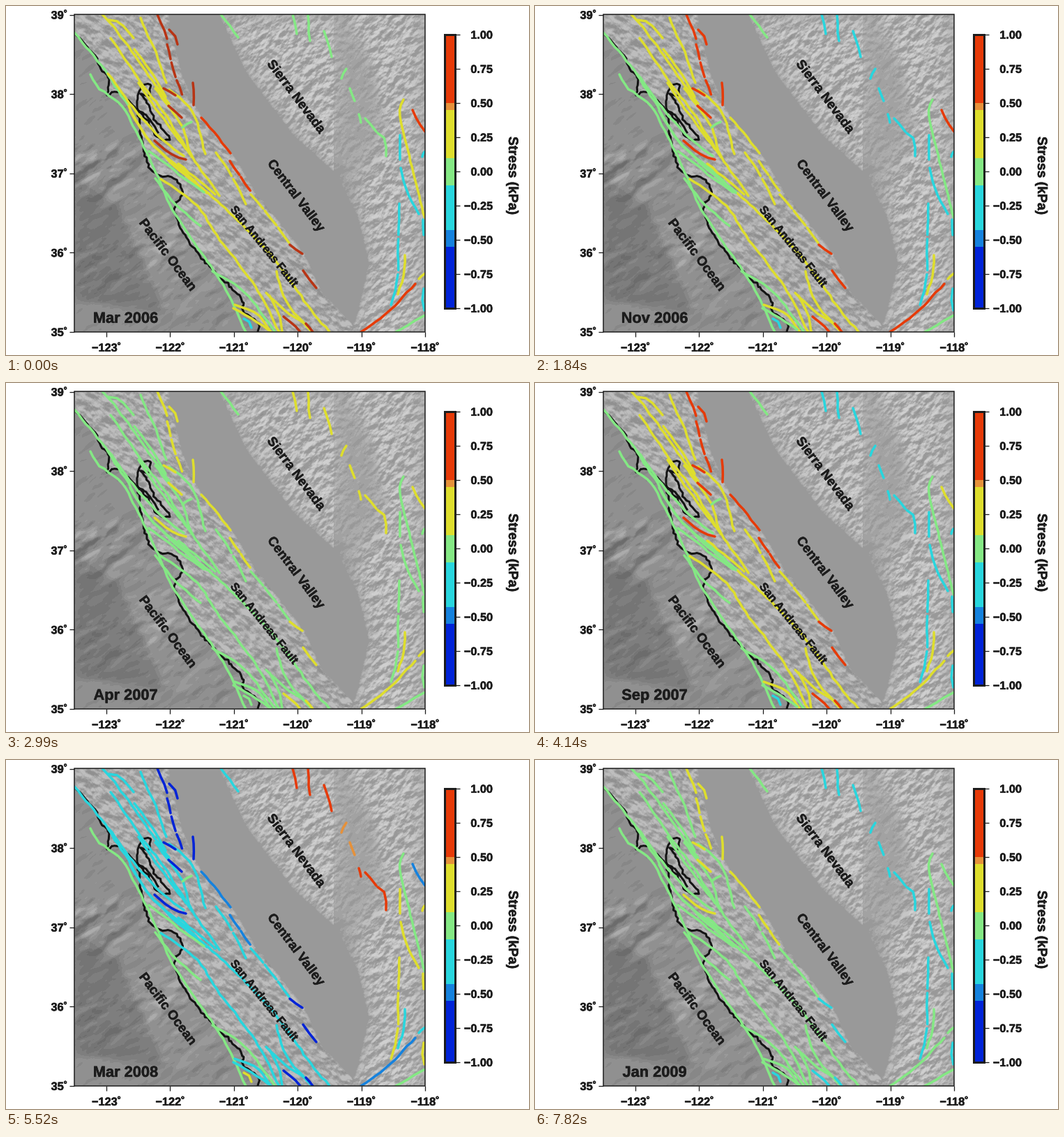
A matplotlib script that plays this animation: 750 by 500 pixels, repeating every 8000 ms.

```python
import numpy as np
import matplotlib.pyplot as plt
import matplotlib.patheffects as pe
from matplotlib.animation import FuncAnimation
from matplotlib.collections import LineCollection
from matplotlib.patches import Rectangle
from matplotlib.path import Path

W, H, DPI = 750, 500, 100
PX = 72 / DPI
LEFT, RIGHT, TOP, BOTTOM = 98, 601, 12, 467
MONTHS = 35
LOOP_MS = 8000
INK = "#1c1c1c"
NAMES = "Jan Feb Mar Apr May Jun Jul Aug Sep Oct Nov Dec".split()

# Stress classes, low to high
BOUNDS = [-0.55, -0.43, -0.1, 0.095, 0.45, 0.5, 1.05]
COLORS = ["#0023d8", "#1582de", "#28d6de", "#84e884",
          "#dede2d", "#e6913a", "#e63a08", "#b83414"]

rng = np.random.default_rng(12)

# ---- stress through time: yearly swing plus a slow drift ------------------
KEYS = np.array([0, 8, 13, 18, 24, 29, 34])
CURVES = {
    "coast": (0.4, [1, 0.45, 0.05, 0.65, -0.8, 0.9, 0.12]),
    "south": (0.4, [1.05, 0.7, 0.2, 0.75, -0.8, 0.85, -0.3]),
    "sierra": (-0.3, [-0.09, -0.3, 0.28, -0.3, 0.75, -0.3, -0.3]),
    "desert": (0.1, [0.75, 0.7, 0.4, 0.2, -0.45, 0.08, 0]),
}


def load(name, month):
    """Regional load; the yearly swing peaks in September."""
    swing, marks = CURVES[name]

    def year(m):
        return swing * np.cos(2 * np.pi * (m - 6) / 12)

    return year(month) + np.interp(month, KEYS, marks - year(KEYS))


# ---- curves ---------------------------------------------------------------
def spline(pts):
    """Catmull-Rom curve through a few points."""
    p = np.array(pts, float)
    p = np.vstack([2 * p[0] - p[1], p, 2 * p[-1] - p[-2]])
    t = np.linspace(0, 1, 12, endpoint=False)[:, None]
    out = []
    for a, b, c, d in zip(p, p[1:], p[2:], p[3:]):
        out.append(b + 0.5 * t * (c - a + t * (2 * a - 5 * b + 4 * c - d
                                               + t * (3 * (b - c) + d - a))))
    return np.vstack(out + [p[-2:-1]])


def resample(line, step, shake=0):
    dist = np.r_[0, np.cumsum(np.hypot(*np.diff(line, axis=0).T))]
    s = np.linspace(0, dist[-1], max(3, int(dist[-1] / step)))
    out = np.c_[np.interp(s, dist, line[:, 0]), np.interp(s, dist, line[:, 1])]
    out[1:-1] += rng.normal(0, shake, (len(s) - 2, 2))
    return out


faults, modes = [], []


def trace(mode, *pts, dashes=1, gap=0.16):
    """Add a fault, cut into equal dashes; mode is (curve, gain, offset)."""
    line = resample(spline(pts), 0.5)
    for part in np.array_split(line, dashes):
        if dashes > 1:
            part = part[:int(len(part) * (1 - gap))]
        faults.append(resample(part, 8, 0.5))
        modes.append(mode)


CALM = ("coast", 0.08, 0)
OUTER = ("coast", 0.12, -0.03)
BAYSIDE = ("coast", 0.13, 0)
COAST = ("coast", 0.32, 0)
MIDDLE = ("coast", 0.75, 0.08)
EDGE = ("coast", 1.0, 0.1)
SOUTH = ("south", 1.0, 0)
SIERRA = ("sierra", 1.0, 0)
FOOTHILL = ("sierra", 0.65, 0)
EAST = ("sierra", 0.45, -0.06)
BORDER = ("sierra", 0.5, -0.1)
DESERT = ("desert", 1.0, 0)

# San Andreas and the shore
trace(OUTER, (98, 38), (140, 90), (176, 143))
trace(BAYSIDE, (176, 143), (203, 190), (250, 236), (290, 268))
trace(COAST, (290, 268), (328, 303), (382, 360), (436, 433), (464, 467))
trace(CALM, (121, 98), (134, 119), (166, 143), (195, 196), (222, 253),
      (240, 294), (311, 400), (344, 467))
trace(CALM, (214, 247), (243, 284), (279, 315))
trace(CALM, (296, 380), (343, 411), (386, 467))
trace(COAST, (222, 248), (273, 285), (304, 331), (358, 403), (392, 467))
trace(COAST, (328, 428), (360, 441), (380, 467))
trace(BAYSIDE, (326, 433), (352, 448), (376, 464))
trace(BORDER, (341, 448), (347, 451), (352, 461))
trace(COAST, (373, 411), (401, 437), (429, 456))
trace(COAST, (388, 380), (403, 426), (438, 466))
trace(COAST, (378, 415), (390, 437), (396, 467))
trace(SOUTH, (398, 445), (411, 455), (422, 467))
trace(SOUTH, (430, 455), (440, 467))

# Coast ranges and the bay
trace(COAST, (138, 12), (153, 29), (191, 80), (234, 140))
trace(COAST, (147, 20), (163, 23), (183, 46))
trace(COAST, (150, 46), (188, 101), (231, 160), (267, 217))
trace(COAST, (193, 17), (202, 40), (215, 66), (230, 110))
trace(COAST, (184, 62), (206, 91), (229, 130))
trace(COAST, (214, 118), (252, 172), (268, 217), (306, 272))
trace(COAST, (190, 110), (217, 150), (258, 205))
trace(COAST, (234, 120), (268, 152), (286, 212))
trace(BAYSIDE, (146, 97), (191, 156), (220, 188), (255, 215))
trace(BAYSIDE, (178, 150), (207, 195), (254, 236), (288, 268))
trace(CALM, (205, 208), (250, 242), (284, 267))
trace(COAST, (247, 226), (300, 270))
trace(CALM, (253, 174), (266, 166))
trace(EDGE, (226, 118), (243, 128))
trace(EDGE, (233, 143), (252, 160))
trace(EDGE, (213, 193), (235, 211), (258, 220))

# West side of the valley
trace(EDGE, (217, 12), (231, 47))
trace(EDGE, (234, 34), (242, 42), (246, 55))
trace(EDGE, (231, 55), (241, 95), (254, 131), dashes=3)
trace(EDGE, (268, 110), (269, 142))
trace(MIDDLE, (280, 160), (300, 183), (322, 211))
trace(MIDDLE, (321, 222), (352, 267), dashes=2, gap=0.1)
trace(COAST, (301, 210), (322, 241), (346, 288), dashes=2, gap=0.1)
trace(COAST, (351, 270), (380, 304), (408, 342), dashes=3, gap=0.1)
trace(SOUTH, (407, 342), (425, 355))
trace(SOUTH, (426, 379), (445, 404))
trace(OUTER, (308, 12), (333, 45))

# Sierra Nevada and the east
trace(SIERRA, (411, 12), (417, 40))
trace(SIERRA, (433, 12), (433, 33), (436, 50))
trace(SIERRA, (456, 36), (467, 73))
trace(FOOTHILL, (488, 90), (481, 104))
trace(FOOTHILL, (493, 118), (500, 136))
trace(SIERRA, (506, 155), (509, 167))
trace(SIERRA, (515, 161), (531, 180))
trace(SIERRA, (533, 182), (543, 190), (545, 215))
trace(("desert", 0.13, 0), (570, 134), (564, 150), (577, 211), (601, 304))
trace(EAST, (565, 185), (565, 220))
trace(EAST, (566, 232), (576, 268), (592, 298))
trace(EAST, (564, 283), (562, 358), (562, 385), (551, 433), dashes=3, gap=0.1)
trace(("desert", 0.5, 0), (572, 357), (570, 385), (562, 413))
trace(DESERT, (509, 467), (546, 440), (587, 398))
trace(("desert", 0.5, 0), (592, 391), (601, 383))
trace(DESERT, (583, 149), (591, 166), (601, 180))
trace(BORDER, (597, 216), (600, 209))
trace(BORDER, (598, 306), (599, 328))
trace(BORDER, (599, 405), (596, 420), (600, 436))
trace(CALM, (559, 467), (601, 443))

SHORE = spline([
    (98, 38), (126, 69), (137, 92), (148, 104), (145, 128), (160, 123),
    (188, 152), (195, 196), (210, 237), (241, 247), (254, 268), (241, 294),
    (264, 339), (296, 377), (331, 411), (341, 426), (340, 437), (361, 454),
    (361, 467)])
BAY = spline([
    (188, 150), (191, 120), (206, 111), (204, 129), (192, 125), (204, 141),
    (213, 163), (235, 190), (217, 188), (200, 162), (188, 148), (201, 156),
    (218, 181)])
VALLEY_WEST = [(232, 12), (252, 100), (280, 160), (322, 208), (354, 262),
               (427, 355), (452, 410), (498, 458)]
VALLEY_EAST = [(505, 440), (521, 368), (505, 300), (470, 236), (413, 185),
               (345, 95), (306, 12)]
DEEP = [(98, 245), (158, 285), (200, 372), (226, 440), (98, 420)]

# ---- shaded relief --------------------------------------------------------
COLS, ROWS = RIGHT - LEFT, BOTTOM - TOP
X, Y = np.meshgrid(np.arange(COLS) + LEFT + 0.5, np.arange(ROWS) + TOP + 0.5)
FX, FY = np.meshgrid(np.fft.fftfreq(COLS), np.fft.fftfreq(ROWS))


def filtered(field, gain):
    return np.fft.ifft2(np.fft.fft2(field) * gain).real


def noise(angle, stretch, scale, power=1.5):
    """Random terrain with ridges running along the given angle."""
    a = np.radians(angle)
    along = (FX * np.cos(a) + FY * np.sin(a)) * stretch
    across = FY * np.cos(a) - FX * np.sin(a)
    gain = (1 + scale ** 2 * (along ** 2 + across ** 2)) ** -power
    h = filtered(rng.normal(size=X.shape), gain)
    return h / h.std()


def hillshade(h):
    gy, gx = np.gradient(h)
    g = gy + 0.35 * gx
    return np.tanh(0.9 * g / g.std())


def mask(points, blur=1.0):
    inside = Path(points).contains_points(np.c_[X.ravel(), Y.ravel()])
    gain = np.exp(-2 * (np.pi * blur) ** 2 * (FX ** 2 + FY ** 2))
    return np.clip(filtered(inside.reshape(X.shape).astype(float), gain), 0, 1)


def bump(x, y, sx, sy):
    return np.exp(-((X - x) / sx) ** 2 - ((Y - y) / sy) ** 2)


def relief():
    east_side = VALLEY_EAST[::-1] + [(498, 458), (480, 475), (610, 475),
                                     (610, 5), (306, 5)]
    sea = mask(list(SHORE) + [(LEFT - 9, BOTTOM + 9), (LEFT - 9, 38)], 0.8)
    valley = mask(VALLEY_WEST + VALLEY_EAST)
    east, foothill = mask(east_side), mask(east_side, 14)
    west = np.clip(1 - sea - valley - east, 0, 1)

    basin = np.clip(noise(60, 2, 160, 2.5) - 0.3, 0, 1) * (X > 470)
    land_w = 168 + 23 * hillshade(noise(51, 1.8, 14))
    land_e = 158 + 20 * foothill - 16 * basin
    land_e = land_e + 30 * foothill * (1 - 0.8 * basin) * hillshade(
        noise(-48, 1.4, 13))
    rough = 4 + 34 * bump(130, 232, 70, 42) + 26 * bump(230, 345, 50, 60)
    rough = rough + 14 * bump(290, 440, 60, 40) + 14 * bump(130, 370, 60, 45)
    floor = 141 - 20 * mask(DEEP, 4) + 12 * bump(225, 340, 45, 55)
    seabed = floor + rough * hillshade(noise(-35, 1.8, 24, 1.8)) ** 3

    gray = sea * seabed + valley * 153 + west * land_w + east * land_e
    gray /= np.maximum(sea + valley + west + east, 0.5)
    return np.clip(np.round(gray / 9) * 9, 96, 225)


# ---- static parts ---------------------------------------------------------
fig = plt.figure(figsize=(W / DPI, H / DPI), dpi=DPI, facecolor="white")
ax = fig.add_axes([0, 0, 1, 1])
ax.axis("off")
ax.imshow(relief(), cmap="gray", vmin=0, vmax=255, aspect="auto",
          extent=(LEFT, RIGHT, BOTTOM, TOP), interpolation="nearest", zorder=1)
ax.set_xlim(0, W)
ax.set_ylim(H, 0)


def label(x, y, text, size, ha="center", angle=0):
    """Bold text whose capitals are centred vertically on (x, y)."""
    a = np.radians(angle)
    off = 0.36 * size
    heavy = pe.withStroke(linewidth=0.5 * PX, foreground=INK)
    return ax.text(x - off * np.sin(a), y + off * np.cos(a), text, ha=ha,
                   va="baseline", rotation=-angle, rotation_mode="anchor",
                   family="Liberation Sans", weight="bold", color=INK,
                   fontsize=size * PX, zorder=6, path_effects=[heavy])


def rule(xs, ys):
    ax.plot(xs, ys, color=INK, lw=1.3 * PX, zorder=5, solid_capstyle="butt")


def minus(text):
    return text.replace("-", "\u2212")


frame = Rectangle((LEFT, TOP), COLS, ROWS, fill=False, ec=INK,
                  lw=1.5 * PX, zorder=5)
ax.add_patch(frame)

for line in (SHORE, BAY):
    shore, = ax.plot(*resample(line, 4, 0.8).T, color="#141414", lw=3 * PX,
                     zorder=2)
    shore.set_clip_path(frame)

traces = LineCollection(faults, linewidths=3.5 * PX, zorder=3,
                        capstyle="round", joinstyle="round")
ax.add_collection(traces, autolim=False)
traces.set_clip_path(frame)

for k in range(6):
    x = RIGHT - 91.4 * k
    rule([x, x], [BOTTOM, BOTTOM + 7])
    label(x, 489, minus(f"{-118 - k}\u02da"), 16.3)
for k in range(5):
    y = BOTTOM - 113.6 * k
    rule([LEFT - 7, LEFT], [y, y])
    label(88, y, f"{35 + k}\u02da", 16.3, "right")

label(417, 129, "Sierra Nevada", 18.9, angle=53)
label(417, 271, "Central Valley", 18.9, angle=53)
label(371, 344, "San Andreas Fault", 16.5, angle=51)
label(233, 356, "Pacific Ocean", 18.9, angle=53)


def bar_y(value):
    return 237 - 196 * value


edges = [-1] + BOUNDS[:-1] + [1]
for lo, hi, color in zip(edges, edges[1:], COLORS):
    ax.add_patch(Rectangle((629, bar_y(hi)), 15, bar_y(lo) - bar_y(hi),
                           fc=color, ec="none", zorder=3))
ax.add_patch(Rectangle((629, 41), 15, 392, fill=False, ec=INK,
                       lw=3 * PX, zorder=4))
for k in range(-4, 5):
    y = bar_y(k / 4)
    rule([644, 651], [y, y])
    label(698, y, minus(f"{k / 4:.2f}"), 16.3, "right")
label(728, 243, "Stress (kPa)", 19.4, angle=90)

date = label(171.5, 446, "", 21.8)


def update(month):
    loads = {name: load(name, month) for name in CURVES}
    values = [gain * loads[name] + offset for name, gain, offset in modes]
    traces.set_color([COLORS[k] for k in np.digitize(values, BOUNDS)])
    date.set_text(f"{NAMES[(month + 2) % 12]} {2006 + (month + 2) // 12}")
    return traces, date


anim = FuncAnimation(fig, update, frames=MONTHS, interval=LOOP_MS / MONTHS,
                     repeat=True, repeat_delay=0)
plt.show()
```
